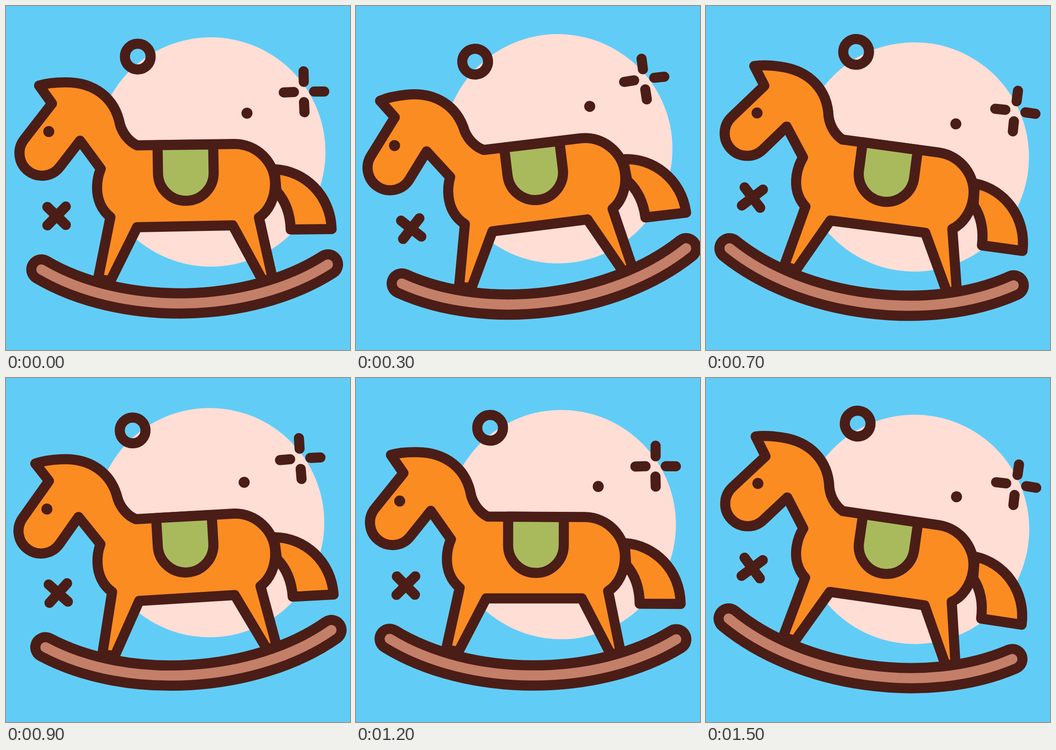
These frames come from a looping animation (748 by 748 pixels, 1.6 s). An HTML page with a canvas:

```html
<!DOCTYPE html>
<html lang="en">
<head>
<meta charset="utf-8">
<title>Rocking horse</title>
<style>
html, body { margin: 0; width: 100%; height: 100%; overflow: hidden; background: #61cdf6; }
canvas { display: block; }
</style>
</head>
<body>
<canvas id="stage" width="748" height="748"></canvas>
<script>
const ctx = document.getElementById('stage').getContext('2d');
const SIZE = 748;
const PIVOT = { x: 376, y: 375 };
const LOOP = 1600, STEP = 100, STEPS_PER_SWING = 4;
const LINE = 22;
const REST_TILT = -0.8; // tilt in degrees at which the shapes below are laid out

const SKY = '#61cdf6', PINK = '#ffded6', DARK = '#4b1d17';
const ORANGE = '#fb8c22', GREEN = '#a9ba5d', WOOD = '#c47f69';

const tail = new Path2D('M584 355 C650 358 706 412 708 485 L619 486 C618 450 606 422 588 402 Z');
const body = new Path2D(`M72 173 C88 168 110 166 128 166 C193 165 237 201 248 258
  C254 278 268 295 285 303 L497 300 C545 300 585 339 585 387 C585 418 571 446 550 460
  L580 594 L558 597 L493 477 L285 481 L227 598 L200 594 L227 459
  C207 443 198 420 198 395 C198 380 201 366 206 354 L161 293 L117 350
  A49 49 0 0 1 48.6 359 A49 49 0 0 1 39.5 290 L100 212 Z`);
const saddle = new Path2D('M329.5 302.5 L330.5 364 A60.5 60.5 0 0 0 451.5 362 L450.5 301 Z');
const rocker = new Path2D('M77 573 C251 675.5 530 670.5 700 562');
const marks = new Path2D(`M647 142 L647.5 165 M648 209 L649 231 M604 188 L626 187
  M670 186 L692 186 M90 437 L130 476 M130 436 L90 477`);

// Each swing leaves the middle quickly and slows towards its far side.
const swings = [
  { side: -1, from: 0.8, to: 6.85 },
  { side: 1, from: 0.3, to: 7.65 },
  { side: -1, from: 0.1, to: 7.7 },
  { side: 1, from: 0.3, to: 8.35 }
];

function tiltAt(time) {
  const step = Math.floor((time % LOOP) / STEP);
  const { side, from, to } = swings[Math.floor(step / STEPS_PER_SWING)];
  const u = (step % STEPS_PER_SWING) / (STEPS_PER_SWING - 1);
  return side * (from + (to - from) * u * (1.35 - 0.35 * u));
}

function disc(x, y, r, color) {
  ctx.beginPath();
  ctx.arc(x, y, r, 0, Math.PI * 2);
  ctx.fillStyle = color;
  ctx.fill();
}

function stroke(path, width = LINE, color = DARK) {
  ctx.lineWidth = width;
  ctx.strokeStyle = color;
  ctx.stroke(path);
}

function outlined(path, color) {
  ctx.fillStyle = color;
  ctx.fill(path);
  stroke(path);
}

function draw(time) {
  ctx.fillStyle = SKY;
  ctx.fillRect(0, 0, SIZE, SIZE);
  ctx.save();
  ctx.translate(PIVOT.x, PIVOT.y);
  ctx.rotate((tiltAt(time) - REST_TILT) * Math.PI / 180);
  ctx.translate(-PIVOT.x, -PIVOT.y);
  ctx.lineCap = ctx.lineJoin = 'round';

  disc(445.3, 317.4, 249.3, PINK);
  const ring = new Path2D();
  ring.arc(286.5, 110, 28, 0, Math.PI * 2);
  stroke(ring);
  stroke(marks);
  disc(524, 233, 12, DARK);

  outlined(tail, ORANGE);
  outlined(body, ORANGE);
  outlined(saddle, GREEN);
  disc(93, 273, 12, DARK);
  stroke(rocker, LINE * 3);
  stroke(rocker, LINE, WOOD);
  ctx.restore();
}

const start = performance.now();
function tick() {
  draw(performance.now() - start);
  requestAnimationFrame(tick);
}
tick();
</script>
</body>
</html>
```
